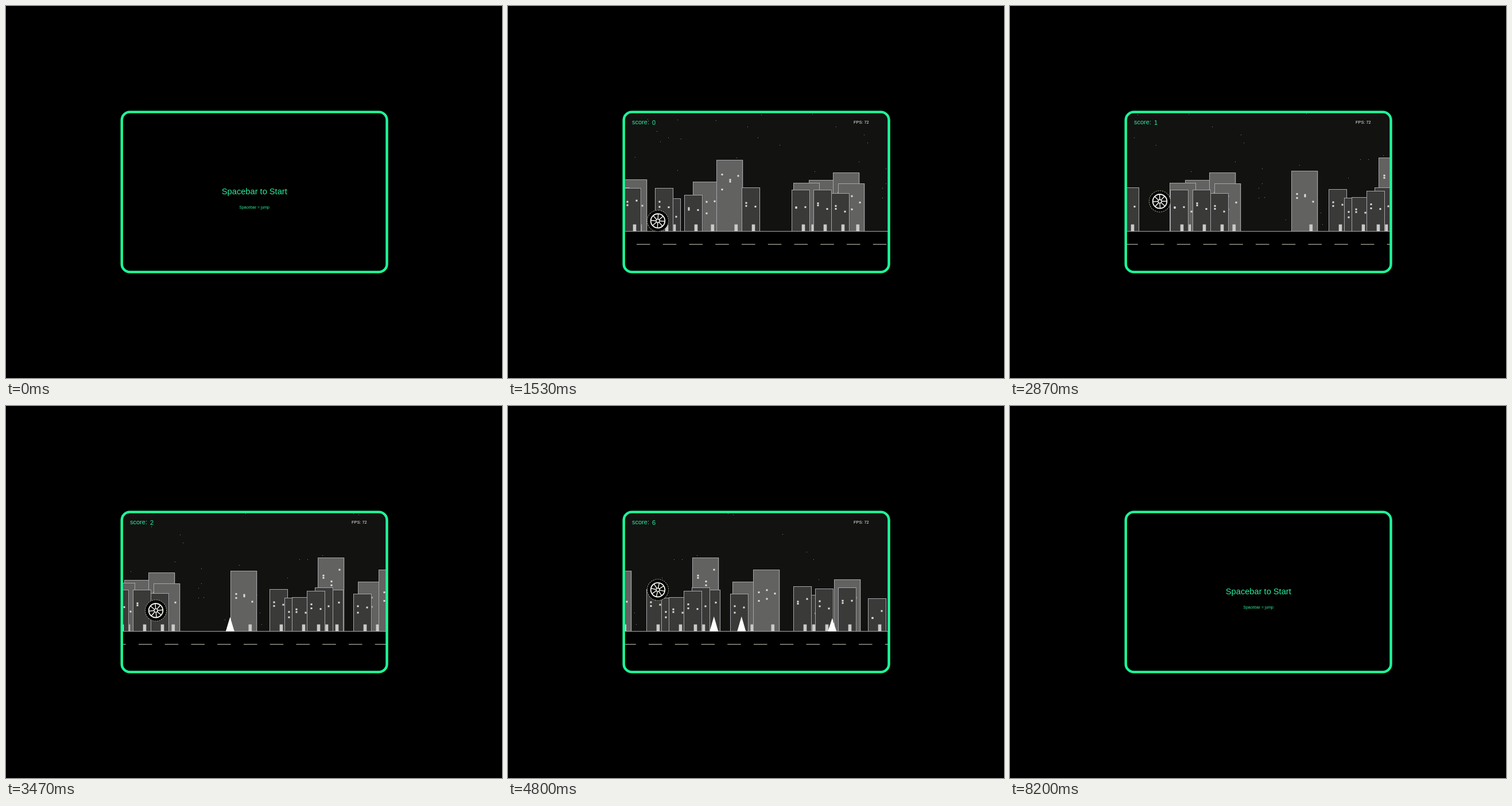
An HTML page with a canvas that plays this animation: 864x648 px, repeating every 8.27 s.

```html
<!DOCTYPE html>
<html lang="en">
<head>
<meta charset="utf-8">
<title>Wheel runner</title>
<style>
html, body { margin: 0; width: 100%; height: 100%; overflow: hidden; background: #000; }
canvas { display: block; }
</style>
</head>
<body>
<canvas id="stage" width="864" height="648"></canvas>
<script>
const ctx = document.getElementById('stage').getContext('2d');
const LOOP = 8270, STEP = 1000 / 15;
const PLAY_START = 8, PLAY_END = 81;
const GREEN = '#1cfb98', TEXT_GREEN = '#2cee9c';
const GROUND = 392.5, LEFT = 204, RIGHT = 662;

// scroll rates relative to the stars and tall buildings
const NEAR = 0.9805, ROAD = 1.9953, SPIKE = 3.17;
const DASH_PERIOD = 45.75;
const JUMP_STEPS = 9, JUMP_HEIGHT = 86;
const JUMPS = [35, 51.5, 61.1, 70.24];

// [step, scrolled distance]
const SCROLL = [[0, -154], [14, 0], [33, 210.5], [43, 318.5], [61, 516], [72, 639.5], [82, 750]];
// [x, height]
const SPIKES = [[1081, 19], [1713, 25], [2187, 34], [2386, 26], [2434, 26], [2592, 23]];

// skylines, back to front: [x, top]
const TALL = [
  [295.5, 302], [422, 306], [463, 268], [623.5, 303], [596.5, 308], [665.5, 290],
  [674.5, 309], [808.5, 287], [960.5, 264], [1030.3, 306], [1066.3, 285], [1207.5, 302]
];
const LOW = [
  [203, 324], [249.5, 322], [278, 316], [298, 317], [367, 335], [353.5, 317], [404.5, 329],
  [505, 316], [591.5, 320], [630, 320], [661, 326], [867.7, 319], [894, 334], [965, 320],
  [947.5, 316], [907.5, 333], [933.5, 322], [1014, 327], [1139, 329], [1124, 314],
  [1162, 318], [1202.5, 316], [1254.5, 335]
];

function seeded(seed) {
  let s = seed | 0;
  return () => {
    s = (s + 0x6d2b79f5) | 0;
    let t = Math.imul(s ^ (s >>> 15), 1 | s);
    t = (t + Math.imul(t ^ (t >>> 7), 61 | t)) ^ t;
    return ((t ^ (t >>> 14)) >>> 0) / 4294967296;
  };
}

function building([x, top], style) {
  const rand = seeded(x * 2);
  const windows = style.columns.map(c => [c, top + style.drop + rand() * style.spread]);
  return { x, top, windows, ...style };
}

const tall = TALL.map(b => building(b, {
  width: 46.5, fill: '#626260', door: 34.3, columns: [10, 10, 24, 24, 38], drop: 20, spread: 36, rate: 1
}));
const low = LOW.map(b => building(b, {
  width: 32.3, fill: '#3a3a39', door: 20.5, columns: [8, 8, 24], drop: 21, spread: 14, rate: NEAR
}));

const starRand = seeded(7);
const stars = Array.from({ length: 62 }, () =>
  [LEFT + starRand() * 1000, Math.round(187 + starRand() ** 1.5 * 196)]);

function scrolled(n) {
  const i = SCROLL.findIndex(k => k[0] > n);
  const [a, from] = SCROLL[i - 1], [b, to] = SCROLL[i];
  return from + (to - from) * (n - a) / (b - a);
}

function wheelY(n) {
  const start = JUMPS.find(j => n >= j && n <= j + JUMP_STEPS);
  if (start === undefined) return 374.3;
  const u = (n - start) / JUMP_STEPS * 2 - 1;
  return 374.3 - JUMP_HEIGHT * (1 - u * u);
}

function text(str, x, y, size, color, align = 'left') {
  ctx.font = size + 'px "Liberation Sans", Arial, sans-serif';
  ctx.fillStyle = color;
  ctx.textAlign = align;
  ctx.fillText(str, x, y);
}

function drawBuilding(b, d) {
  const x = Math.round(b.x - d * b.rate);
  if (x > RIGHT || x + b.width < LEFT) return;
  ctx.fillStyle = b.fill;
  ctx.fillRect(x, b.top, b.width, GROUND - b.top);
  ctx.strokeStyle = '#a6a6aa';
  ctx.lineWidth = 1;
  ctx.strokeRect(x + 0.5, b.top + 0.5, Math.floor(b.width) - 1, GROUND - b.top);
  ctx.fillStyle = '#dcdcd8';
  for (const [wx, wy] of b.windows) ctx.fillRect(x + wx - 1.5, wy - 1.5, 3, 3);
  ctx.fillStyle = '#cacaca';
  ctx.fillRect(x + b.door - 2.8, 380.5, 5.6, 12);
}

function ring(r, width, color) {
  ctx.beginPath();
  ctx.arc(0, 0, r, 0, Math.PI * 2);
  ctx.lineWidth = width;
  ctx.strokeStyle = color;
  ctx.stroke();
}

function wheel(x, y, angle) {
  ctx.save();
  ctx.translate(x, y);
  ctx.rotate(angle);
  ctx.fillStyle = '#000';
  ctx.beginPath();
  ctx.arc(0, 0, 18.5, 0, Math.PI * 2);
  ctx.fill();
  ctx.setLineDash([2.4, 1.4]);
  ring(18.5, 1, '#a0a08c');
  ctx.setLineDash([]);
  ring(12.3, 1.9, '#f4f4ee');
  ring(3, 1.5, '#f4f4ee');
  ctx.beginPath();
  for (let i = 0; i < 8; i++) {
    const a = i * Math.PI / 4;
    ctx.moveTo(Math.cos(a) * 3.5, Math.sin(a) * 3.5);
    ctx.lineTo(Math.cos(a) * 12, Math.sin(a) * 12);
  }
  ctx.stroke();
  ctx.restore();
}

function drawSpike(x, h) {
  ctx.beginPath();
  ctx.moveTo(x - 7.5, GROUND);
  ctx.lineTo(x, GROUND - h);
  ctx.lineTo(x + 7.5, GROUND);
  ctx.fill();
}

function game(n) {
  const d = scrolled(n);
  ctx.save();
  ctx.beginPath();
  ctx.roundRect(202, 185, 461.5, 278, 13);
  ctx.clip();

  ctx.fillStyle = '#121211';
  ctx.fillRect(200, 183, 466, GROUND - 183);
  ctx.fillStyle = '#8c8c92';
  for (const [x, y] of stars) ctx.fillRect(Math.round(x - d), y, 1, 1);
  for (const b of tall) drawBuilding(b, d);
  for (const b of low) drawBuilding(b, d);

  ctx.fillStyle = '#000';
  ctx.fillRect(200, GROUND, 466, 75);
  ctx.fillStyle = '#a8a8b0';
  ctx.fillRect(200, 392, 466, 1);
  ctx.fillStyle = '#b4b4a6';
  const first = LEFT - DASH_PERIOD + (36 + (1000 * DASH_PERIOD - d * ROAD)) % DASH_PERIOD;
  for (let x = first; x < RIGHT; x += DASH_PERIOD) ctx.fillRect(x, 414.6, 23.5, 1.2);

  const places = SPIKES.map(([x, h]) => [x - d * SPIKE, h]);
  ctx.fillStyle = '#fff';
  for (const [x, h] of places) drawSpike(x, h);
  const score = places.filter(([x]) => x < RIGHT).length;

  wheel(261, wheelY(n), d * ROAD / 18);
  text('score:', 216, 206, 11, TEXT_GREEN);
  text(score, 251, 206.6, 11, TEXT_GREEN);
  text('FPS: 72', 602, 204.6, 7.4, '#f0f0f0');
  ctx.restore();
}

function draw(now) {
  const n = Math.floor((now % LOOP + 5) / STEP);
  ctx.fillStyle = '#000';
  ctx.fillRect(0, 0, 864, 648);
  if (n >= PLAY_START && n < PLAY_END) {
    game(n);
  } else {
    text('Spacebar to Start', 432.8, 328.3, 14.65, TEXT_GREEN, 'center');
    text('Spacebar = jump', 432.6, 353.3, 6.95, TEXT_GREEN, 'center');
  }
  ctx.strokeStyle = GREEN;
  ctx.lineWidth = 4.4;
  ctx.beginPath();
  ctx.roundRect(201.7, 184.6, 461.8, 278.8, 14);
  ctx.stroke();
}

let origin;
function tick(now) {
  if (origin === undefined) origin = now;
  draw(now - origin);
  requestAnimationFrame(tick);
}
draw(0);
requestAnimationFrame(tick);
</script>
</body>
</html>
```
